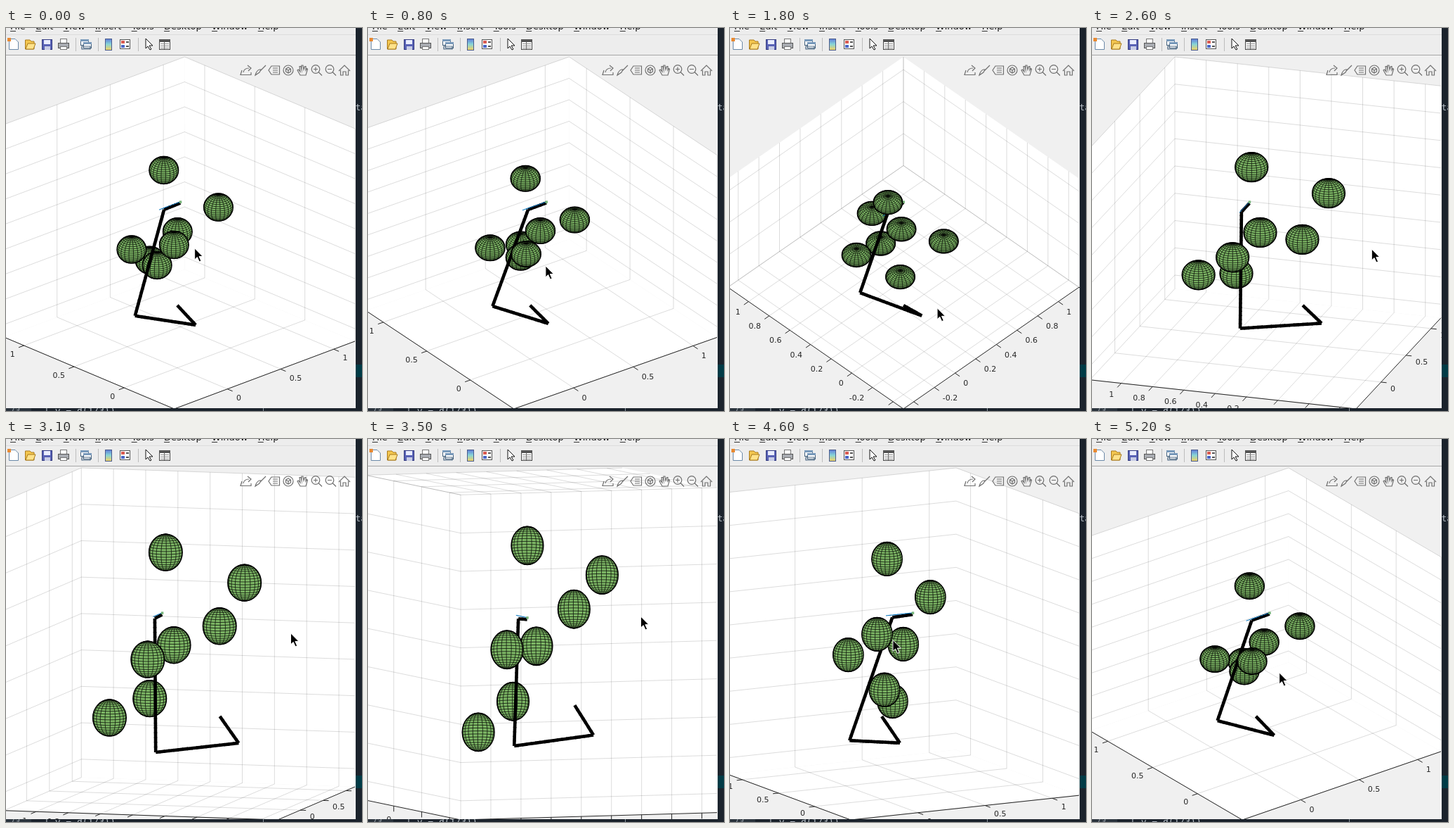
Recreate the animation shown at these times as an HTML page with a canvas. Size 507 by 544 pixels, loop 5300 ms.

```html
<!DOCTYPE html>
<html lang="en">
<head>
<meta charset="utf-8">
<title>Rotating arm plot</title>
<style>
html, body { margin: 0; width: 100%; height: 100%; overflow: hidden; background: #1b232c; }
canvas { display: block; }
</style>
</head>
<body>
<canvas id="stage" width="507" height="544"></canvas>
<script>
const ctx = document.getElementById('stage').getContext('2d');
const LOOP = 5300, STEP = 100, START = 400;
const LO = -0.5, HI = 1.2, MID = (LO + HI) / 2, SPAN = HI - LO;
const RADIUS = 0.1, INK = '#262626', SANS = '"DejaVu Sans", sans-serif';

// Key views of the drag: time, azimuth to the left, elevation
const views = [
  [START, 43.3, 24.9], [1300, 26.2, 51.5], [1800, 45, 57.7], [2600, 72.3, 22.4],
  [3500, 69.7, -3.7], [4050, 49, -9.6], [4600, 28.3, 10.4], [5200, 37.5, 30]
];
const spheres = [
  [0.26, 0.41, 0.86], [0.33, -0.06, 0.7], [-0.04, -0.01, 0.5], [0.37, 0.39, 0.34],
  [-0.01, 0.445, 0.3], [0.3, 0.52, 0.05], [0.53, 0.835, -0.09]
];
const arm = [[0, 0, 0], [0.085, -0.093, -0.153], [-0.03, 0.39, -0.206], [0.35, 0.503, 0.485], [0.5, 0.5, 0.49]];
const goal = [0.5, 0.5, 0.5], goalStart = [0.3, 0.5, 0.5];

// Smooth curve through the key views, at rest at both ends
function viewAt(t) {
  const last = views.length - 1;
  t = Math.max(START, Math.min(t, views[last][0]));
  let i = 0;
  while (i < last - 1 && t > views[i + 1][0]) i++;
  const slope = (n, k) => n === 0 || n === last ? 0 :
    (views[n + 1][k] - views[n - 1][k]) / (views[n + 1][0] - views[n - 1][0]);
  const a = views[i], b = views[i + 1], d = b[0] - a[0], u = (t - a[0]) / d, v = 1 - u;
  return [1, 2].map(k => v * v * (1 + 2 * u) * a[k] + u * u * (3 - 2 * u) * b[k] +
    d * u * v * (v * slope(i, k) - u * slope(i + 1, k)));
}

// The pointer drives the view; it starts a little behind and catches up
function pointerAt(t, az, el) {
  const lag = Math.max(0, Math.min(1, 1 - (t - START) / 900));
  const idle = t < 300 ? 5 : 0;
  return [224 + (az - 26.2) / 0.2645 - 15 * lag - idle, 383 + (el - 51.5) / 0.4215 - 5 * lag - (t < STEP ? 2 : 0)];
}

// Orthographic view stretched to fill the axes rectangle
function makeView(az, el) {
  const r = Math.PI / 180;
  const s = Math.sin(az * r), c = Math.cos(az * r), se = Math.sin(el * r), ce = Math.cos(el * r);
  const kx = 500 / (s + c), ky = 500 / (Math.abs(se) * (s + c) + ce);
  const turn = p => {
    const [x, y, z] = p.map(v => (v - MID) / SPAN);
    return [c * x - s * y, s * x + c * y, z];
  };
  return {
    el, kx, ky,
    toward: [-ce * s, -ce * c, se],
    point(p) {
      const [x, d, z] = turn(p);
      return [247 + kx * x, 291 - ky * (se * d + ce * z)];
    },
    depth(p) {
      const [, d, z] = turn(p);
      return se * z - ce * d;
    }
  };
}

function trace(points, close) {
  points.forEach((p, i) => i ? ctx.lineTo(...p) : ctx.moveTo(...p));
  if (close) ctx.closePath();
}
function stroke(color, width) {
  ctx.strokeStyle = color;
  ctx.lineWidth = width;
  ctx.stroke();
}
function line(points, color, width = 1) {
  ctx.beginPath();
  trace(points);
  stroke(color, width);
}
function fillShape(points, color) {
  ctx.beginPath();
  trace(points, true);
  ctx.fillStyle = color;
  ctx.fill();
}
function rect(x, y, w, h, fill, edge) {
  ctx.fillStyle = edge || fill;
  ctx.fillRect(x, y, w, h);
  if (!edge) return;
  ctx.fillStyle = fill;
  ctx.fillRect(x + 1, y + 1, w - 2, h - 2);
}
function text(str, x, y, font, color, align = 'left', base = 'alphabetic') {
  ctx.font = font;
  ctx.fillStyle = color;
  ctx.textAlign = align;
  ctx.textBaseline = base;
  ctx.fillText(str, x, y);
}
// Small icon given as a path around its own centre
function glyph(x, y, d, edge, fill, width = 1.2) {
  const p = new Path2D(d);
  ctx.save();
  ctx.translate(x, y);
  if (fill) { ctx.fillStyle = fill; ctx.fill(p); }
  ctx.strokeStyle = edge;
  ctx.lineWidth = width;
  ctx.stroke(p);
  ctx.restore();
}
const circle = r => `M${r} 0A${r} ${r} 0 1 1 ${-r} 0A${r} ${r} 0 1 1 ${r} 0`;
const ARROW = 'M0 0V16L3.7 12.6L6.6 19L9.2 17.8L6.4 11.6H11.5Z';

// Tick spacing is fine where the axis is long enough on screen
function ticks(view, axis) {
  const a = [MID, MID, MID], b = a.slice();
  b[axis] += 0.2;
  const p = view.point(a), r = view.point(b);
  const h = Math.abs(r[0] - p[0]), v = Math.abs(r[1] - p[1]);
  const fine = axis === 2 ? v > 27 : h > 40 || h + 1.4 * v > 52;
  const step = fine ? 0.2 : 0.5, list = [];
  for (let n = Math.ceil(LO / step); n * step <= HI + 1e-6; n++) list.push(n * step);
  return list;
}

function drawAxes(view) {
  const P = (x, y, z) => view.point([x, y, z]);
  const below = view.el < 0, edge = below ? HI : LO, far = below ? LO : HI;
  fillShape([P(LO, LO, edge), P(HI, LO, edge), P(HI, HI, edge), P(LO, HI, edge)], '#fff');
  fillShape([P(LO, HI, edge), P(HI, HI, edge), P(HI, HI, far), P(LO, HI, far)], '#fff');
  fillShape([P(HI, LO, edge), P(HI, HI, edge), P(HI, HI, far), P(HI, LO, far)], '#fff');

  const grid = 'rgba(38,38,38,.16)', tx = ticks(view, 0), ty = ticks(view, 1);
  tx.forEach(v => line([P(v, LO, edge), P(v, HI, edge), P(v, HI, far)], grid));
  ty.forEach(v => line([P(LO, v, edge), P(HI, v, edge), P(HI, v, far)], grid));
  ticks(view, 2).forEach(v => line([P(LO, HI, v), P(HI, HI, v), P(HI, LO, v)], grid));

  const corner = P(LO, LO, LO);
  const ruler = (at, values, end, side) => {
    const dx = corner[0] - end[0], dy = corner[1] - end[1], len = Math.hypot(dx, dy);
    const [ox, oy] = view.el < 5 ? [0, 1] : [dx / len, dy / len];
    line([at(LO), at(HI)], INK);
    values.forEach(v => {
      const [x, y] = at(v);
      line([[x, y], [x + ox * 8, y + oy * 8]], INK);
      text(String(+v.toFixed(1) || 0), x + ox * 10 + side * 3.5, y + oy * 10 + 9.5,
        '11px ' + SANS, INK, side > 0 ? 'left' : 'right', 'middle');
    });
  };
  const side = below ? -1 : 1;
  ruler(v => P(v, edge, LO), tx, P(LO, HI, LO), side);
  ruler(v => P(edge, v, LO), ty, P(HI, LO, LO), -side);
}

function drawSphere(view, center) {
  const N = 20, t = view.toward;
  const unit = (i, j) => {
    const lat = (i / N - 0.5) * Math.PI, lon = j / N * 2 * Math.PI;
    return [Math.cos(lat) * Math.cos(lon), Math.cos(lat) * Math.sin(lon), Math.sin(lat)];
  };
  const put = (i, j) => view.point(unit(i, j).map((v, k) => center[k] + RADIUS * v));
  const r = RADIUS / SPAN;
  ctx.beginPath();
  ctx.ellipse(...view.point(center), r * view.kx, r * view.ky, 0, 0, 7);
  ctx.fillStyle = '#7db765';
  ctx.fill();
  stroke('#000', 1.4);
  ctx.beginPath();
  for (let i = 0; i < N; i++) {
    for (let j = 0; j < N; j++) {
      const n = unit(i + 0.5, j + 0.5);
      if (n.reduce((sum, v, k) => sum + v * t[k], 0) > 0) trace([put(i + 1, j), put(i, j), put(i, j + 1)]);
    }
  }
  stroke('#000', 0.7);
}

// Short pieces, so that each can pass before or behind a sphere
function segment(view, a, b, color, width) {
  const at = u => a.map((v, k) => v + (b[k] - v) * Math.min(1, u));
  const count = Math.ceil(Math.hypot(...a.map((v, k) => b[k] - v)) * 35);
  return Array.from({ length: count }, (_, i) => {
    const ends = [at(i / count), at((i + 1.2) / count)].map(view.point);
    return [view.depth(at((i + 0.5) / count)), () => line(ends, color, width)];
  });
}

function drawScene(view) {
  const [gx, gy] = view.point(goal);
  const items = spheres.map(p => [view.depth(p), () => drawSphere(view, p)]);
  arm.slice(1).forEach((p, i) => items.push(...segment(view, arm[i], p, '#000', 4.6)));
  items.push(...segment(view, goalStart, goal, '#0072bd', 1));
  items.push([view.depth(goal) + 0.01, () => rect(gx - 1.5, gy - 1.5, 3.5, 3.5, '#77b57a')]);
  items.sort((a, b) => a[0] - b[0]).forEach(item => item[1]());
}

function drawBackdrop() {
  const mono = '13px "DejaVu Sans Mono", monospace';
  rect(0, 0, 507, 544, '#1b232c');
  rect(498, 478, 9, 18, '#003b46');
  text('ta', 497.5, 117, mono, '#b8c0c8');
  rect(0, 540, 36, 4, '#2b343d');
  text('73', 5, 548, mono, '#8b949c');
  text('| y = d(1/3))', 54, 548, mono, '#b8c0c8');
  rect(366, 540, 1, 4, '#8b949c');
}

function drawMenu() {
  rect(0, 0, 498, 39, '#ededed');
  let x = 6;
  for (const name of ['File', 'Edit', 'View', 'Insert', 'Tools', 'Desktop', 'Window', 'Help']) {
    text(name, x, 2, '13px ' + SANS, '#111');
    rect(x, 4, 8, 1, '#333');
    x += ctx.measureText(name).width + 14.4;
  }
  rect(0, 9, 498, 1, '#dcdcdc');
  rect(0, 38, 498, 1, '#a6a6a6');
  for (const x of [99, 131, 188]) rect(x, 14, 1, 19, '#bdbdbd');

  const y = 23;
  glyph(11, y, 'M-6.5-7.5H2L6.5-3V7.5H-6.5Z', '#6b89a8', '#fff', 1);
  rect(2, 14, 5, 5, '#e88a32');
  glyph(34, y, 'M-6.5 7V-6H0L2-4H6V7Z', '#a97a1c', '#f3c64f', 1);
  glyph(34, y, 'M-6 7L-3-1H8L5 7Z', '#a97a1c', '#ffe28a', 1);
  rect(51, 16, 15, 15, '#5962b5', '#343b80');
  rect(54, 17, 9, 6, '#e9edff');
  rect(55, 26, 8, 5, '#c8cde6');
  rect(77, 15, 10, 8, '#fff', '#777');
  rect(74, 21, 16, 8, '#a9acb2', '#555');
  rect(77, 26, 10, 5, '#fff', '#777');
  for (const d of [0, 4]) {
    rect(106 + d, 16 + d, 12, 9, '#fff', '#46637f');
    rect(106 + d, 16 + d, 12, 3, '#7899ba');
  }
  glyph(114, 28, 'M-6-2H6V2H-6Z', '#46637f');
  const bar = ctx.createLinearGradient(0, 15, 0, 31);
  ['#5d75d8', '#86d5d8', '#f0d264'].forEach((color, i) => bar.addColorStop(i / 2, color));
  rect(141, 15, 10, 17, bar, '#4b5c8c');
  rect(162, 16, 15, 14, '#fff', '#555');
  ['#d95a50', '#4b68c9'].forEach((color, i) => {
    rect(164, 18 + 6 * i, 5, 4, color);
    rect(171, 19 + 6 * i, 4, 2, '#555');
  });
  glyph(199, 15, 'M0 0V14L3 11L6 16L8 15L5 10H10Z', '#111', '#fff', 1);
  rect(218, 16, 16, 15, '#fff', '#444');
  rect(218, 16, 16, 4, '#555');
  rect(225, 20, 1, 10, '#666');
  for (let i = 0; i < 3; i++) rect(220, 22 + 3 * i, 12, 1, '#888');
}

function drawTools() {
  const lens = 'M3 2.5L8 7.5M-4-1.5H2';
  const icons = [
    'M-6 0L-8 6.5H7V3M-4 3Q-3-3 4-3M2-7L7-3L3 1',
    'M8-7L0 1M1-1L-1 3L-7 7Q-5 0-1-1Z',
    'M-4-6H7.5V6H-4L-8 0ZM-2-3H5M-2 0H5M-2 3H5',
    circle(7) + 'M-3.5-2L0-4L3.5-2V2L0 4L-3.5 2ZL0 0V4M0 0L3.5-2',
    'M-3 7L-7 0L-5.5-1L-3 2L-4-5.5H-2L-1-1V-7H1L2-1L3.5-5.5H5V0L6.5-2.5L7.5-1.5L5 7Z',
    lens + 'M-1-4.5V1.5',
    lens,
    'M-8 1L0-7L8 1M-5.5 0V7H-2V2H2V7H5.5V0'
  ];
  icons.forEach((d, i) => {
    const x = 342 + 20 * i;
    glyph(x, 60, d, '#707070');
    if (d.startsWith(lens)) glyph(x - 1, 58.5, circle(5.8), '#707070');
  });
}

function render(t) {
  const [az, el] = viewAt(t), view = makeView(az, el);
  drawBackdrop();
  ctx.save();
  ctx.beginPath();
  ctx.rect(0, 0, 498, 540);
  ctx.clip();
  rect(0, 39, 498, 501, '#f0f0f0');
  drawAxes(view);
  drawScene(view);
  drawMenu();
  drawTools();
  ctx.restore();
  glyph(...pointerAt(t, az, el), ARROW, '#fff', '#000', 1);
}

function tick() {
  const t = performance.now() % LOOP;
  render(Math.floor(t / STEP) * STEP);
  requestAnimationFrame(tick);
}
tick();
</script>
</body>
</html>
```
